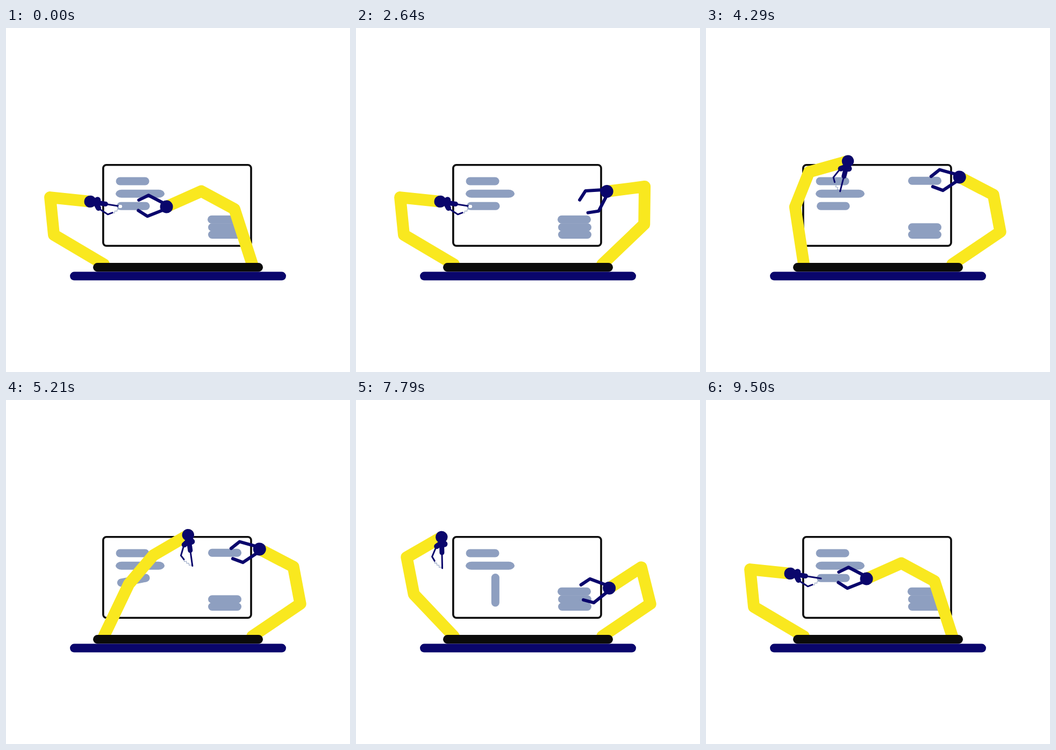
Animation, 640 px wide and 640 px high, one loop 9570 ms. Source, as an HTML page:

```html
<!DOCTYPE html>
<html lang="en">
<head>
<meta charset="utf-8">
<title>Robot arms at a laptop</title>
<style>
  html, body { margin: 0; width: 100%; height: 100%; overflow: hidden; background: #fff; }
  svg { display: block; width: 100%; height: 100%; }
  .bar { fill: #8e9fc0; }
  .arm { fill: none; stroke: #f9e81f; stroke-width: 22; stroke-linecap: round; stroke-linejoin: round; }
  .navy { fill: #0a066c; }
  .line { fill: none; stroke: #0a066c; stroke-linecap: round; stroke-linejoin: round; }
</style>
</head>
<body>
<svg viewBox="0 0 640 640">
  <defs>
    <path id="jaw" class="line" stroke-width="6" d="M5 6L34.5 19.5L52 9.7"/>
  </defs>
  <rect x="180.8" y="254.7" width="275.2" height="150.6" rx="6" fill="none" stroke="#0b0b0b" stroke-width="3.6"/>

  <g class="bar">
    <rect x="204.5" y="277.5" width="62" height="15" rx="7.5"/>
    <rect x="204" y="300.7" width="91" height="15" rx="11" ry="7.5"/>
    <rect id="fallingBar" x="206" y="323.7" width="61.5" height="15" rx="7.5"/>
    <rect id="liftedBar" x="375" y="348.7" width="62" height="15" rx="7.5"/>
    <rect x="376" y="363.2" width="62" height="15" rx="7.5"/>
    <rect x="376" y="377" width="62" height="15" rx="7.5"/>
  </g>

  <polyline id="rightArm" class="arm"/>
  <g id="gripper">
    <use id="jawA" href="#jaw"/>
    <use id="jawB" href="#jaw"/>
    <circle class="navy" r="12"/>
  </g>

  <polyline id="leftArm" class="arm"/>
  <g id="tool">
    <path fill="none" stroke="#8e9fc0" d="M44 14H48V10H52V6H56V1H59"/>
    <path class="line" stroke-width="3" d="M29 0H58M17 10L36 18.5L44 14"/>
    <path class="line" stroke-width="9" d="M11 0H29"/>
    <path class="line" stroke-width="10" d="M13 -5L13 4L17 9.5"/>
    <circle class="navy" cx="13" cy="-5" r="5.8"/>
    <circle class="navy" r="11.2"/>
  </g>

  <g id="sparks" fill="#fff"></g>
  <rect x="162" y="437" width="316" height="16.5" rx="8.2" fill="#0b0b0b"/>
  <rect class="navy" x="119" y="453.6" width="402" height="16" rx="8"/>
</svg>

<script>
const LOOP = 9570;
const $ = id => document.getElementById(id);
const radians = degrees => degrees * Math.PI / 180;

const smooth = u => u * u * (3 - 2 * u);
const speedUp = u => u * u;
const slowDown = u => 1 - (1 - u) * (1 - u);
const progress = (t, begin, end) => Math.min(1, Math.max(0, (t - begin) / (end - begin)));

// A track starts at a value and eases to the next one in each move.
const track = (first, ...moves) => t =>
  moves.reduce((value, [begin, end, next, ease = smooth]) => {
    const u = ease(progress(t, begin, end));
    return value.map((v, i) => v + (next[i] - v) * u);
  }, first);

// Poses in degrees: upper arm, middle arm, forearm, hand.
const weld = [-149.4, -95.7, 6, 9];
const reach = [-64.4, -49.6, -30.3, 82];
const rest = [-146.3, -110.5, -30, 90];

const place = [-107.9, -151.6, -204, -177];
const aside = [-43.9, -89.2, -187.3, -213];
const low = [-16, -106.6, -185, -189];
const raised = [-34.1, -100.7, -152.4, -189];
const lowered = [-34.1, -104, -213, -189];
const over = [-115.9, -150.8, -177.6, -246.6];

const leftPose = track(weld,
  [3500, 4900, reach], [6000, 7950, rest, speedUp], [8500, 9500, weld]);
const rightPose = track(place,
  [1500, 2640, aside, speedUp], [2640, 3000, low, slowDown], [3150, 3700, raised],
  [7080, 7550, lowered], [7800, 8430, over], [8550, 9500, place]);
const jawOpening = track([0],
  [500, 1500, [5]], [3000, 3150, [0]], [7550, 7800, [5]], [8430, 8550, [0]]);
const barLift = track([0], [3150, 3700, [1]], [7080, 7550, [0]]);
const barTurn = track([0], [5060, 5500, [93], speedUp], [7000, 7500, [90]], [8550, 9500, [0]]);

// Draws a three-part arm and puts its hand at the end.
function poseArm(arm, hand, x, y, foreLength, pose) {
  const points = [[x, y]];
  [108, 70, foreLength].forEach((length, i) => {
    x += length * Math.cos(radians(pose[i]));
    y += length * Math.sin(radians(pose[i]));
    points.push([x, y]);
  });
  arm.setAttribute('points', points.join(' '));
  hand.setAttribute('transform', `translate(${x} ${y}) rotate(${pose[3]})`);
}

const sparkDots = Array.from({ length: 5 }, () =>
  $('sparks').appendChild(document.createElementNS('http://www.w3.org/2000/svg', 'circle')));

function drawSparks(t) {
  const phase = t % 440 / 440;
  $('sparks').style.display = t < 3500 ? '' : 'none';
  sparkDots.forEach((dot, i) => {
    const angle = radians(72 * i);
    dot.setAttribute('cx', 212.6 + 36 * phase * Math.cos(angle));
    dot.setAttribute('cy', 332 + 24 * phase * Math.sin(angle));
    dot.setAttribute('r', 3 - 2 * phase);
  });
}

function draw(t) {
  const left = leftPose(t);
  left[3] += 53 * Math.sin(Math.PI * progress(t, 3500, 4900)); // the tool swings wide on its way
  poseArm($('leftArm'), $('tool'), 182, 439.7, 75, left);
  poseArm($('rightArm'), $('gripper'), 458.2, 439.7, 71, rightPose(t));

  const [opening] = jawOpening(t), [lift] = barLift(t), [turn] = barTurn(t);
  $('jawA').setAttribute('transform', `rotate(${opening})`);
  $('jawB').setAttribute('transform', `scale(1 -1) rotate(${opening})`);
  $('liftedBar').setAttribute('transform', `translate(${lift} ${-72 * lift})`);
  $('fallingBar').setAttribute('transform', `rotate(${-turn} 259.3 331.2)`);
  drawSparks(t);
}

const start = performance.now();
function tick() {
  draw((performance.now() - start) % LOOP);
  requestAnimationFrame(tick);
}
draw(0);
requestAnimationFrame(tick);
</script>
</body>
</html>
```
